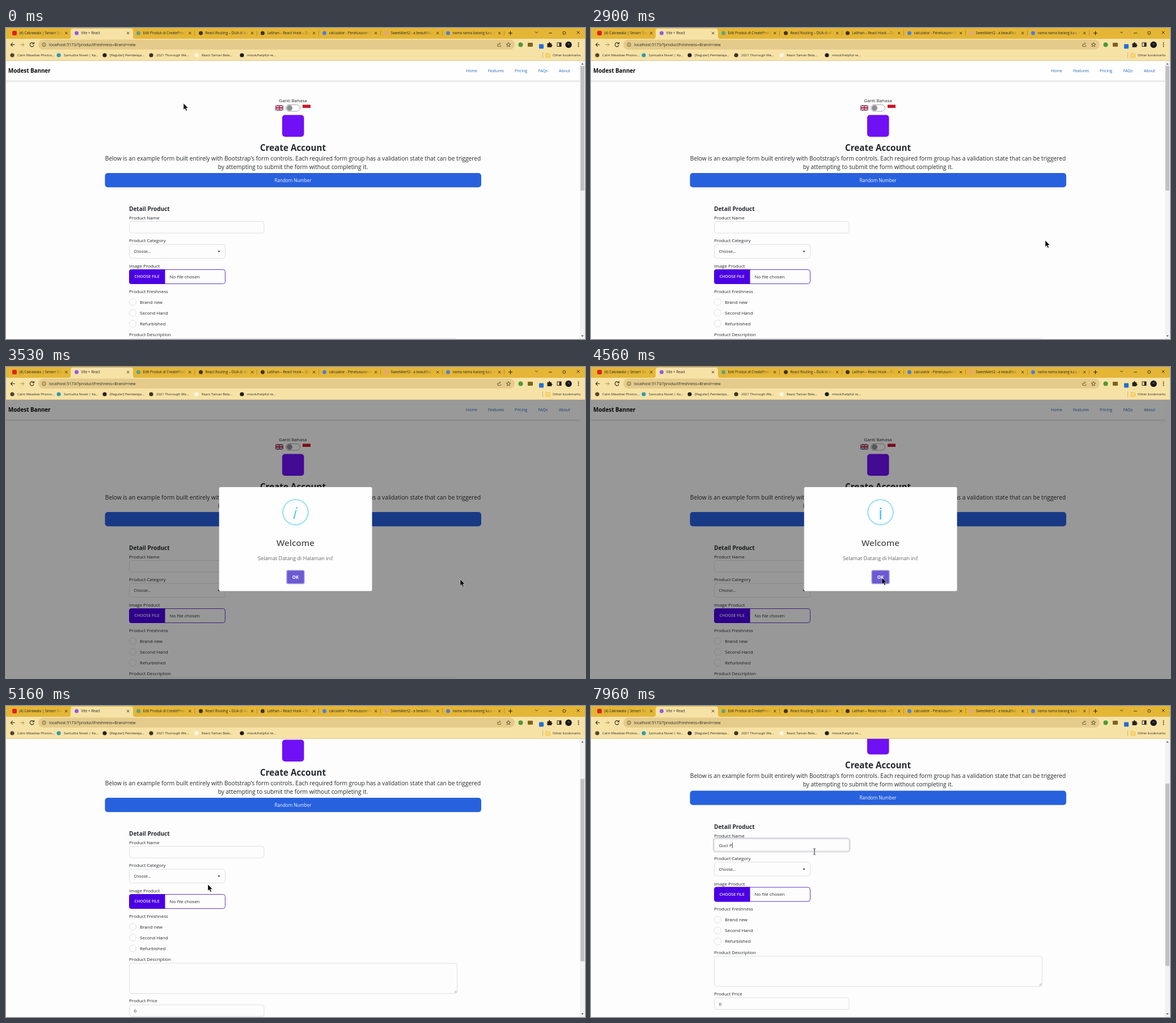
Write an HTML page that moves like this. It is 1021 by 549 pixels and loops after 8000 ms.

```html
<!DOCTYPE html>
<html lang="en">
<head>
<meta charset="utf-8">
<title>Create Account</title>
<style>
  html, body { margin: 0; width: 100%; height: 100%; overflow: hidden; background: #fdfdfd; }
  svg { display: block; width: 1021px; height: 549px; font-family: "Open Sans", "Noto Sans", sans-serif; }
</style>
</head>
<body>
<svg id="stage" viewBox="0 0 1021 549"></svg>
<script>
const LOOP = 8000, OPEN = 2930, CLOSE = 4600, FOCUS = 6250, BEAM = 5950;
const TYPED = 'Guci P', KEY_TIMES = [6900, 7080, 7230, 7400, 7600, 7860];
const STRIP = '#e5b636', BAR = '#f7e2a6', FIELD = '#e4cb8c', INK = '#25282c', LINE = '#dfe0e4';

// Markup helpers
const text = (x, y, size, str, extra = '') =>
  `<text x="${x}" y="${y}" font-size="${size}" fill="${INK}" ${extra}>${str}</text>`;
const rect = (x, y, w, h, fill, extra = '') =>
  `<rect x="${x}" y="${y}" width="${w}" height="${h}" fill="${fill}" ${extra}/>`;
const circle = (x, y, r, fill, extra = '') =>
  `<circle cx="${x}" cy="${y}" r="${r}" fill="${fill}" ${extra}/>`;
const path = (d, stroke = '#333', width = 1, fill = 'none') =>
  `<path d="${d}" stroke="${stroke}" stroke-width="${width}" fill="${fill}"/>`;
const box = (x, y, w, h, stroke = LINE, rx = 4) =>
  rect(x, y, w, h, '#fdfdfd', `rx="${rx}" stroke="${stroke}"`);
const MID = 'text-anchor="middle"';

function tabs() {
  const list = [
    ['(4) Cakrawala | Senam Sore', '#e3201b'], ['Vite + React', '#8a5cf0'],
    ['Edit Produk di CreateProduct', '#5aa28c'], ['React Routing – DUA di Alam', '#3d3420'],
    ['Latihan – React Hook – DUA', '#3d3420'], ['calculator - Penelusuran Web', '#4a7fe0'],
    ['SweetAlert2 - a beautiful, res', '#e8a08c'], ['nama nama barang lucu nan', '#4a7fe0']
  ];
  return list.map(([title, color], i) => {
    const x = Math.round(i * 109.2), active = i === 1;
    const mark = i === 0 ? rect(11, 5, 8, 8, color, 'rx="2"') : circle(x + 15.5, 9, 3.5, color);
    return (active ? path('M110 19Q114 19 114 15V5Q114 1 118 1H220Q224 1 224 5V15Q224 19 228 19Z', 'none', 0, BAR) : '') +
      mark + `<g clip-path="url(#tab)" transform="translate(${x} 0)">${text(23.5, 11.3, 6.2, title)}</g>` +
      (active ? '' : rect(x + 83, 3, 17, 13, 'url(#fade)')) +
      path(`M${x + 104} 6.8l4.4 4.4m0-4.4l-4.4 4.4`, '#33290f', .9) +
      (i > 1 ? path(`M${x + 114.5} 4.5v9`, '#a98423', .8) : '');
  }).join('');
}

function bookmarks() {
  const list = [
    [7, 'Calm Meadow Photos...', '#4d4632'], [89, 'Samudra Novel | Ka...', '#2a9db5'],
    [170, '[Reguler] Pembelaja...', '#222'], [252, '2021 Thorough We...', '#3d3420'],
    [332, 'React Taman Bela...', '#fdf6e4'], [412, 'mivok/helpful-re...', '#1c1c1c']
  ];
  return list.map(([x, title, color]) =>
    circle(x + 4, 48, 3.6, color) + text(x + 13, 50.2, 6, title)).join('') +
    path('M946.5 43v10', '#bda767', .8) +
    path('M952 44.5h3l1 1h3.5v6.5h-7.5z', '#e3b440', .6, '#fbd768') +
    text(964, 50.2, 6, 'Other bookmarks');
}

function browser() {
  return rect(0, 0, 1021, 19, STRIP) + rect(0, 19, 1021, 38.5, BAR) + tabs() +
    path('M889.5 5.5v7m-3.5-3.5h7', '#2b230e', 1.1) +
    path('M933 6.5l2.5 2.5 2.5-2.5M957 9h6M1006.5 5.500l5 5m0-5l-5 5', '#2b230e', .9) +
    rect(982, 6.5, 4.5, 4.5, 'none', 'rx="1" stroke="#2b230e" stroke-width=".9"') +
    path('M15.5 29.5h-7m3.2-3.3l-3.3 3.3 3.3 3.3', '#30290f', 1.1) +
    path('M25 29.5h7m-3.2-3.3l3.3 3.3-3.3 3.3', '#a89458', 1) +
    path('M48.5 27.2a3.5 3.5 0 1 0 .6 3.3M49.4 25v3h-3', '#30290f', 1.1) +
    rect(57, 20.5, 840, 17.5, FIELD, 'rx="8.7"') +
    circle(67, 29.5, 3.2, 'none', 'stroke="#50441f" stroke-width=".8"') +
    path('M67 29v2.2M67 27.3v.9', '#50441f', .8) +
    text(76, 32, 7, 'localhost:5173/?productFreshness=Brand+new') +
    path('M867 28v4.5h5.5v-2M867.5 30.5q.5-3 4-3m-1.5-2l2 2-2 2', '#5b4e25', .8) +
    path('M886 25.7l1.1 2.5 2.7.2-2.1 1.8.7 2.7-2.4-1.5-2.4 1.5.7-2.7-2.1-1.8 2.7-.2z', '#40371b', .8) +
    circle(907.5, 29.5, 4, '#4b9a35') +
    rect(920, 26, 9, 7, '#7d641c', 'rx="1"') +
    rect(940, 28.5, 8, 8, '#1f6fd6', 'rx="1"') +
    path('M954.5 27h2.5q-.3-2 1.3-2t1.3 2h2.4v2.5q1.5-.3 1.5 1.2t-1.5 1.2v2h-7.5z', 'none', 0, '#29230f') +
    rect(972, 26, 7, 6.5, 'none', 'stroke="#29230f"') + rect(975.5, 26, 3.5, 6.5, '#29230f') +
    circle(992, 29.5, 5.7, '#17181c') + circle(992, 28.5, 1.6, '#4d4f55') +
    [26.5, 29.5, 32.5].map(y => circle(1009.5, y, .9, '#29230f')).join('') +
    bookmarks() + rect(0, 57, 1021, 1, '#dcc78c');
}

function header() {
  const nav = [['Home', 811], ['Features', 850], ['Pricing', 897], ['FAQs', 938.5], ['About', 975]];
  return rect(0, 92.5, 1012, 4, 'url(#shade)') + rect(0, 58, 1012, 34.5, '#fefefe') +
    text(4, 79, 9.8, 'Modest Banner', 'font-weight="700" style="fill:#080808"') +
    nav.map(([s, x]) => text(x, 77.8, 7, s, 'style="fill:#1f66b8"')).join('');
}

function flags() {
  const cross = 'M482 136v10M475 141h14', diagonal = 'M475 136l14 10m0-10l-14 10';
  return rect(475, 136, 14, 10, '#1d2f6f') + `<g clip-path="url(#flag)">` +
    path(diagonal, '#fff', 2) + path(diagonal, '#c8233a', .7) +
    path(cross, '#fff', 3.2) + path(cross, '#c8233a', 1.8) + '</g>' +
    rect(523, 135.5, 14, 5.5, '#cf1126') + rect(523, 141, 14, 5, '#fff');
}

function form() {
  const labels = [['Product Name', 338], ['Product Category', 378.3], ['Image Product', 423],
    ['Product Freshness', 467.6], ['Product Description', 544.4], ['Product Price', 617.4]];
  const radios = [['Brand new', 483.7], ['Second Hand', 502.8], ['Refurbished', 521.9]];
  return text(217, 323, 10, 'Detail Product', 'font-weight="700"') +
    labels.map(([s, y]) => text(217, y, 8, s)).join('') +
    rect(215.7, 339.7, 240.8, 24.3, 'none', 'id="ring" rx="5" stroke="#bfc0c8" stroke-width="1.2"') +
    box(217.5, 341.5, 237.5, 20.5) + text(225.5, 355.2, 7.9, '', 'id="typed"') +
    rect(0, 347.5, .8, 10, '#222', 'id="caret"') +
    box(217.5, 382, 169, 24.5) + text(225.5, 397, 7, 'Choose...') +
    path('M373.3 393.5h4.4l-2.2 2.4z', 'none', 0, '#222') +
    box(217.5, 426.5, 169, 25, '#6238c6') +
    path('M280.5 426v26H221.5Q217 452 217 447.5V430.5Q217 426 221.5 426Z', 'none', 0, '#4b00e4') +
    text(248.5, 441.4, 7.05, 'CHOOSE FILE', MID + ' font-weight="600" style="fill:#f1ecff"') +
    text(288.5, 441.7, 8, 'No file chosen') +
    radios.map(([s, y]) => circle(223.3, y, 6.1, '#fdfdfd', `stroke="${LINE}"`) + text(236, y + 3, 8, s)).join('') +
    box(217.5, 548, 578, 53.5) + path('M790.5 600l4-4m-1.7 4l1.7-1.7', '#777', .7) +
    box(217.5, 621.5, 237.5, 20.5) + text(225.5, 635, 8, '0');
}

function page() {
  return header() + text(506, 131.4, 8, 'Ganti Bahasa', MID) + flags() +
    rect(493.5, 135.5, 25, 11.5, '#fdfdfd', 'rx="5.7" stroke="#a5a6aa"') + circle(500, 141.2, 5, '#8f9095') +
    rect(487, 153.5, 38.5, 38.5, '#7010f5', 'rx="5"') +
    text(506, 216.5, 15.2, 'Create Account', MID + ' font-weight="700"') +
    text(506, 233.6, 10.2, 'Below is an example form built entirely with Bootstrap’s form controls. Each required form group has a validation state that can be triggered', MID) +
    text(506, 248.6, 10.2, 'by attempting to submit the form without completing it.', MID) +
    rect(174.5, 256, 663.5, 25.3, '#2861de', 'rx="5"') +
    text(506, 271.7, 8.05, 'Random Number', MID + ' style="fill:#f5f7ff"') + form();
}

function modal() {
  return rect(375.8, 212, 269.7, 183.5, '#fefefe', 'rx="2.6"') +
    '<g id="icon">' + circle(510.5, 256.3, 22.3, 'none', 'stroke="#9de0f6" stroke-width="2.2"') +
    `<g id="mark">${text(510.5, 268.5, 30, 'i', MID + ' style="fill:#3fc3ee"')}</g></g>` +
    text(510.5, 315.5, 15.2, 'Welcome', MID + ' font-weight="600" style="fill:#545454"') +
    text(510.5, 340.6, 9.1, 'Selamat Datang di Halaman ini!', MID + ' style="fill:#656565"') +
    rect(494.2, 358.2, 32.6, 25.3, '#b7b0ec', 'rx="3"') + rect(495.6, 359.6, 29.8, 22.5, '#6c5ad2', 'rx="2"') +
    text(510.5, 373.8, 7.9, 'OK', MID + ' font-weight="700" style="fill:#fff"');
}

document.getElementById('stage').innerHTML = `
  <defs>
    <linearGradient id="fade"><stop stop-color="${STRIP}" stop-opacity="0"/><stop offset="1" stop-color="${STRIP}"/></linearGradient>
    <linearGradient id="shade" x2="0" y2="1"><stop stop-color="#000" stop-opacity=".14"/><stop offset="1" stop-color="#000" stop-opacity="0"/></linearGradient>
    <clipPath id="tab"><rect x="20" width="79" height="19"/></clipPath>
    <clipPath id="flag"><rect x="475" y="136" width="14" height="10"/></clipPath>
    <clipPath id="view"><rect y="58" width="1021" height="491"/></clipPath>
  </defs>
  ${rect(0, 0, 1021, 549, '#fdfdfd')}
  <g clip-path="url(#view)"><g id="page">${page()}</g></g>
  <g id="scrollbar">${rect(1012, 58, 9, 491, '#f2f2f2')}${rect(1013, 67, 7, 220, '#c1c1c1', 'id="thumb"')}
    ${path('M1014.3 64.5l2.2-2.5 2.2 2.5zM1014.3 542.5l2.2 2.5 2.2-2.5z', 'none', 0, '#555')}</g>
  ${browser()}
  ${rect(0, 58, 1021, 491, '#000', 'id="dim"')}
  <g id="modal">${modal()}</g>
  <g id="pointer">
    <path id="arrow" d="M0 0v11.3l2.6-2.4 1.9 4.3 1.9-.8-1.9-4.2h3.6z" fill="#000" stroke="#fff" stroke-width=".5"/>
    <path id="beam" d="M-2-5h1.5l.5.5.5-.5H2M0-4.5v9M-2 5h1.5l.5-.5.5.5H2" fill="none" stroke="#111" stroke-width=".9"/>
  </g>`;

// Cubic easing, solved by bisection
function bezier(x1, y1, x2, y2) {
  const at = (a, b, s) => 3 * a * s * (1 - s) ** 2 + 3 * b * s * s * (1 - s) + s ** 3;
  return x => {
    let lo = 0, hi = 1;
    for (let i = 0; i < 24; i++) {
      const s = (lo + hi) / 2;
      if (at(x1, x2, s) < x) lo = s; else hi = s;
    }
    return at(y1, y2, (lo + hi) / 2);
  };
}
const ease = bezier(.25, .1, .25, 1), inOut = bezier(.42, 0, .58, 1);

// Value of a keyed track at time t; each key is [time, ...values]
function track(keys, t, curve = ease) {
  if (t <= keys[0][0]) return keys[0].slice(1);
  const i = keys.findIndex(k => k[0] > t);
  if (i < 0) return keys[keys.length - 1].slice(1);
  const a = keys[i - 1], b = keys[i], p = curve((t - a[0]) / (b[0] - a[0]));
  return a.slice(1).map((v, j) => v + (b[j + 1] - v) * p);
}

const POINTER = [[60, 313, 133], [1150, 803, 412], [1750, 803, 412], [2300, 801, 375], [3800, 801, 375],
  [4420, 513, 372], [4600, 513, 372], [4700, 535, 391], [5160, 356, 315], [5650, 356, 315], [6200, 394, 257]];
const SCROLL = [[4948, 0], [5228, 106.5]];
const DIM = [[OPEN, 0], [OPEN + 100, .4], [CLOSE, .4], [CLOSE + 100, 0]];
const POPUP = [[OPEN, .7, 1], [OPEN + 135, 1.05, 1], [OPEN + 240, .95, 1], [OPEN + 300, 1, 1], [CLOSE, 1, 1], [CLOSE + 150, .5, 0]];
const ICON = [[OPEN, 100, 0], [OPEN + 500, 0, 1]];
const MARK = [[OPEN, 45, 0], [OPEN + 200, -25, .4], [OPEN + 600, 15, .8], [OPEN + 800, 0, 1]];

const el = id => document.getElementById(id);
const set = (id, attrs) => { for (const k in attrs) el(id).setAttribute(k, attrs[k]); };
const show = (id, on) => set(id, { visibility: on ? 'visible' : 'hidden' });
const scaleAt = (x, y, sx, sy) => `translate(${x} ${y}) scale(${sx} ${sy}) translate(${-x} ${-y})`;

function draw(t) {
  const [scroll] = track(SCROLL, t, inOut);
  set('page', { transform: `translate(0 ${-scroll})` });
  show('scrollbar', t < OPEN || t >= CLOSE + 150);
  set('thumb', t < OPEN ? { y: 67, height: 220 } : { y: 67 + scroll * .656, height: 322 });

  const open = t >= OPEN && t < CLOSE + 150;
  const [scale, alpha] = track(POPUP, t);
  const [tilt, iconAlpha] = track(ICON, t);
  const [spin, markAlpha] = track(MARK, t);
  set('dim', { opacity: track(DIM, t)[0] });
  set('modal', { display: open ? 'inline' : 'none', opacity: alpha, transform: scaleAt(510.6, 303.7, scale, scale) });
  set('icon', { opacity: iconAlpha, transform: scaleAt(510.5, 256.3, 1, Math.cos(tilt * Math.PI / 180)) });
  set('mark', { opacity: markAlpha, transform: `rotate(${spin} 510.5 257)` });

  const count = KEY_TIMES.filter(k => k <= t).length;
  const since = t - (count ? KEY_TIMES[count - 1] : FOCUS);
  el('typed').textContent = TYPED.slice(0, count);
  set('caret', { x: 225.7 + (count ? el('typed').getComputedTextLength() : 0) });
  show('ring', t >= FOCUS);
  show('caret', t >= FOCUS && since % 1000 < 500);

  const [x, y] = track(POINTER, t, inOut);
  set('pointer', { transform: `translate(${x} ${y})` });
  show('arrow', t < BEAM);
  show('beam', t >= BEAM);
}

const start = performance.now();
function tick() {
  draw((performance.now() - start) % LOOP);
  requestAnimationFrame(tick);
}
tick();
</script>
</body>
</html>
```
